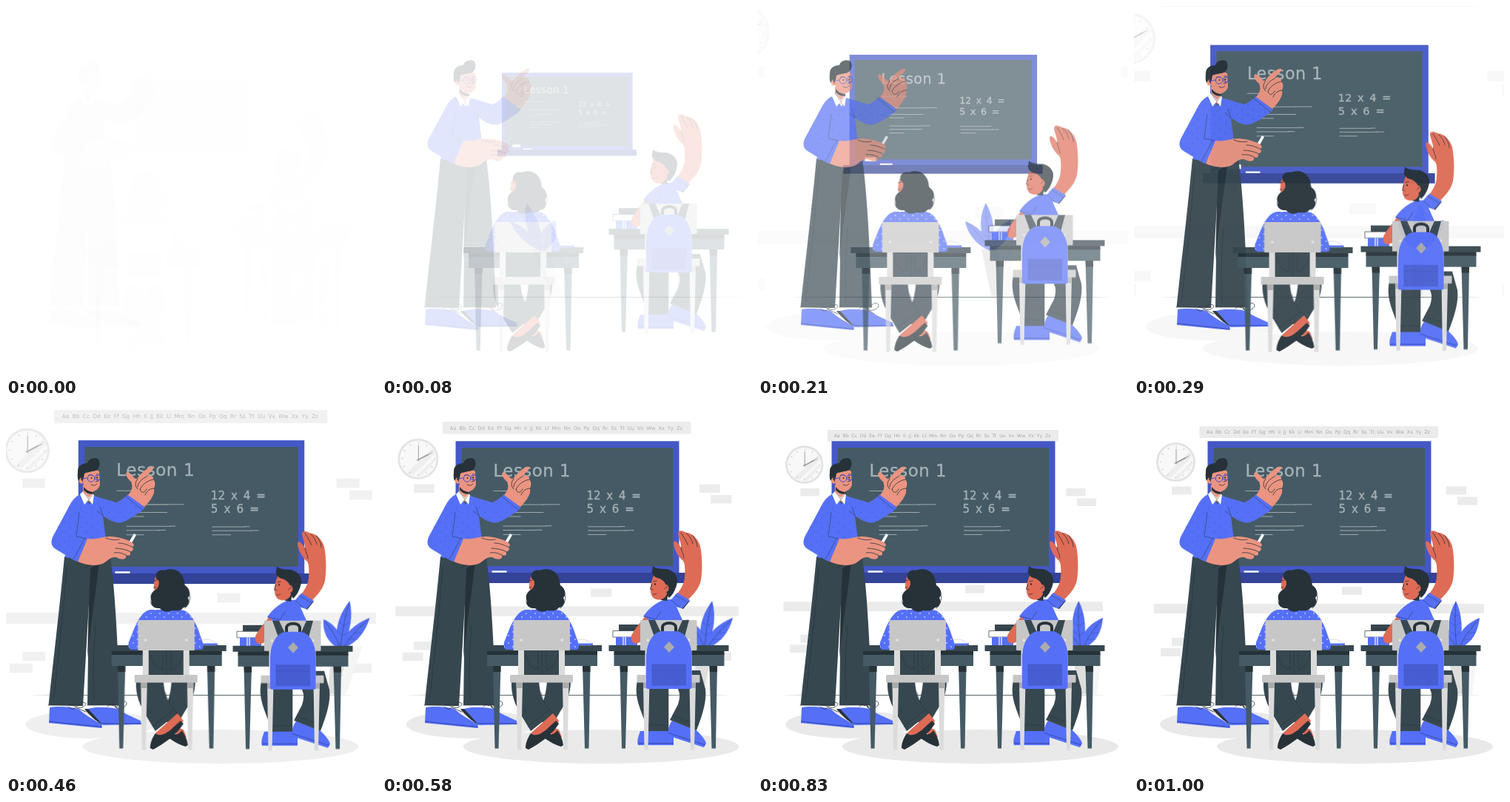
Write an HTML page that moves like this. It is 500x500 px and loops after 1040 ms.

```html
<!DOCTYPE html>
<html lang="en">
<head>
<meta charset="utf-8">
<title>Lesson</title>
<style>
  html, body { margin: 0; width: 100%; height: 100%; overflow: hidden; background: #fff; }
  svg { display: block; width: 100vw; height: 100vh; }
  text { font-family: "DejaVu Sans", sans-serif; }

  .in { animation: .5s cubic-bezier(.36, -.01, .5, 1.38) both; }
  .slow { animation-duration: 1s; }
  .fade { animation-name: fade; }
  .grow { animation-name: grow; transform-origin: 250px 146.5px; }
  .shrink { animation-name: shrink; transform-origin: 250px 186px; }
  .from-left { animation-name: from-left; }
  .from-right { animation-name: from-right; }
  .from-top { animation-name: from-top; }
  .rush { animation-name: rush; transform-origin: 440px 330px; }

  @keyframes fade { from { opacity: 0; } }
  @keyframes grow { from { opacity: 0; transform: scale(.5); } }
  @keyframes shrink { from { opacity: 0; transform: scale(1.5); } }
  @keyframes from-left { from { opacity: 0; transform: translateX(-30px); } }
  @keyframes from-right { from { opacity: 0; transform: translateX(30px); } }
  @keyframes from-top { from { opacity: 0; transform: translateY(-30px); } }
  @keyframes rush {
    from { opacity: 0; transform: translateX(-250px) skewX(20deg); }
    60% { opacity: 1; transform: translateX(0) skewX(-10deg); }
    80% { opacity: 1; transform: translateX(0) skewX(2deg); }
    to { opacity: 1; transform: translateX(0) skewX(0deg); }
  }

  .blue { fill: #5570f7; }
  .deep { fill: #4458c6; }
  .slate { fill: #455a64; }
  .pants { fill: #37474f; }
  .dark { fill: #263238; }
  .skin { fill: #eb9481; }
  .tan { fill: #de6b55; }
  .pale { fill: #ebebeb; }
  .ink { fill: none; stroke: #263238; stroke-width: .8; stroke-linecap: round; stroke-linejoin: round; }
  .thin { stroke-width: .5; }
  .chalk { fill: #fff; stroke: #fff; stroke-width: .35; opacity: .52; }
  .strokes { fill: none; stroke: #fff; stroke-width: 1; stroke-linecap: round; opacity: .48; }
</style>
</head>
<body>
<svg viewBox="0 0 500 500" preserveAspectRatio="none">
  <defs>
    <pattern id="dots" width="12" height="10" patternUnits="userSpaceOnUse">
      <circle cx="3" cy="3" r=".8" fill="#fff"/><circle cx="9" cy="8" r=".8" fill="#fff"/>
    </pattern>
    <pattern id="specks" width="15" height="13" patternUnits="userSpaceOnUse">
      <circle cx="4" cy="4" r=".55" fill="#3345a8"/><circle cx="11" cy="10" r=".55" fill="#3345a8"/>
    </pattern>
    <pattern id="weave" width="3" height="3" patternUnits="userSpaceOnUse">
      <path d="M0 0H3M0 0V3" fill="none" stroke="#4157cc" stroke-width=".5"/>
    </pattern>
    <g id="desk">
      <path class="slate" d="M150 352H160.500L157.500 465.500H152.500ZM271 352H281.500L279.500 465.500H274Z"/>
      <path class="dark" d="M150 353H160.500V362H150.500ZM271 353H281.500V362H271.500Z"/>
      <rect class="slate" x="142" y="337" width="149" height="17"/>
      <rect class="dark" x="142" y="333" width="149" height="6"/>
      <rect class="pants" x="135" y="326" width="162" height="8"/>
    </g>
    <g id="chair">
      <path fill="#dbdbdb" d="M184 330h8v38h-8zM239 330h8v38h-8zM181.500 376H190L188 467.500H183ZM244 376H252.500L250.500 467.500H245.500Z"/>
      <path fill="#ababab" d="M181.500 376H190V384H181.700ZM244 376H252.500V384H244.200Z"/>
      <rect x="177.500" y="292" width="76.500" height="41" rx="1" fill="#c7c7c7"/>
      <rect x="173" y="366" width="85" height="10.500" rx="1" fill="#c7c7c7"/>
      <path fill="#e0e0e0" d="M186 319a2 2 0 1 0 4 0a2 2 0 1 0-4 0M241 319a2 2 0 1 0 4 0a2 2 0 1 0-4 0"/>
    </g>
    <path id="sweater" d="M103 121C96 123 91 128 87 135L65 176C60 184 60 192 67 196L95 213L102 198L136 192L131 151C139 157 149 162 157 160C169 155 181 147 188 140L165 122C159 127 154 131 149 133L119 124L113 136Z"/>
    <path id="blouse" d="M194 278C184 280 178 291 173 302L165 322Q163 332 170 332H262Q268 332 265 322L258 302C253 291 247 280 237 278Z"/>
  </defs>

  <g class="in slow from-left" fill="#e9e9e9">
    <ellipse cx="122" cy="433" rx="87" ry="19"/>
    <ellipse cx="298.500" cy="463" rx="186.500" ry="23"/>
  </g>

  <!-- wall -->
  <g class="in slow shrink">
    <path class="pale" d="M51 111.500h26.500v11h-26.500zM422 111.500h27v11h-27zM437 125.500h27v11h-27zM281 247h27v11h-27zM27 270h446v13h-446zM51 316h27v11h-27zM36 330h27v11h-27zM437 330h26.500v11h-26.500z"/>
    <rect class="pale" x="88.500" y="30" width="322.500" height="16"/>
    <text x="249" y="40.300" font-size="6.400" word-spacing="1.850" text-anchor="middle" fill="#a6a6a6">Aa Bb Cc Dd Ee Ff Gg Hh Ii Jj Kk Ll Mm Nn Oo Pp Qq Rr Ss Tt Uu Vv Ww Xx Yy Zz</text>
    <circle cx="56.500" cy="78.500" r="26.500" fill="#e2e2e2"/>
    <circle cx="56.500" cy="78.500" r="23.800" fill="#f8f8f8"/>
    <path d="M42 97L75 65L78.500 71L50 99.500ZM54 101L79.500 76L79.800 80L60 101Z" fill="#ededed"/>
    <circle cx="56.500" cy="78.500" r="20.700" fill="none" stroke="#bdbdbd" stroke-width="2.500" stroke-dasharray=".8 10.039" stroke-dashoffset=".4"/>
    <path d="M57 81.500V60.500M54.500 80.500L74 70.500" fill="none" stroke="#a6a6a6" stroke-width="1.100"/>
    <path d="M57 79.500L70 72.500" stroke="#999" stroke-width="1.600"/>
    <circle cx="57" cy="79.300" r="1.500" fill="#a6a6a6"/>
  </g>

  <path class="in from-right dark" d="M32 393.400L140 393.100H370L470 393.400L370 393.700H140Z"/>

  <!-- blackboard -->
  <g class="in grow">
    <rect class="deep" x="99.500" y="50.200" width="302" height="179"/>
    <rect class="slate" x="108" y="59" width="285" height="160"/>
    <rect x="89.500" y="228" width="321" height="14" fill="#334397"/>
    <path fill="#fff" d="M148.500 225.300h20v2.400h-20zM124 216h18v6h-18z"/>
    <g class="chalk">
      <text x="150.500" y="97.500" font-size="22.800" letter-spacing=".55">Lesson 1</text>
      <g font-size="15">
        <text x="276.500" y="129" word-spacing="3">12 x 4 =</text>
        <text x="276.500" y="147" word-spacing="3.200">5 x 6 =</text>
      </g>
    </g>
    <path class="strokes" d="M151 117.500H191M164 136H218M164 146.500H218M164 152H187M164 165H222M164 170.500H208M164 176.500H187M278.500 165.800H322M278.500 171H330M278.500 176.500H303"/>
    <path class="strokes" stroke-width=".6" d="M218 135.800H240M208 170.300H216M222 164.700H229M322 165.500H328M330 170.700H340"/>
  </g>

  <!-- plant -->
  <g class="in slow rush">
    <path fill="#f5f5f5" d="M444 328H465L457 392H444Z"/>
    <path fill="#dedede" d="M424 328H447L445 392H432Z"/>
    <path class="blue" d="M435 266C424 285 422 308 433 330H439C445 308 444 285 435 266ZM467 289C448 297 435 311 438 330H441C458 321 465 308 467 289ZM405 291C407 310 420 325 436 331C434 312 425 299 405 291Z"/>
    <path class="ink thin" d="M435 269C433 291 434 311 436 330M466 291C455 304 444 316 440 330M407 293C418 304 429 317 436 330"/>
    <path fill="none" stroke="#3a4db2" stroke-width=".5" d="M434 288L428 282M434 288L440 283M434 300L426 294M434 300L442 295M435 313L427 307M435 313L442 308M457 302L457 298M450 310L460 309M445 318L457 318"/>
  </g>

  <!-- teacher -->
  <g class="in fade">
    <path class="blue" d="M59 410C68 408 92 409 99 413C109 422 121 428 130 433L129 438L58 431Z"/>
    <path class="dark" d="M106 412H113L133 432L129 432.500C121 428 112 420 106 412Z"/>
    <path class="blue" d="M111 412C122 408 143 410 151 412C160 419 172 423 182 428L183 433L131 434Z"/>
    <path d="M58 429L130 436.500M128 431.500L183 432" fill="none" stroke="#3547b0" stroke-width="1"/>
    <path class="pants" d="M79 206L141 207C147 248 151 320 154 407H110L112 270L104 408L57.500 407C64 345 72 280 79 206Z"/>
    <path class="dark" d="M114 222L126 214C122 250 115 292 110 344L112 270Z"/>
    <path class="ink" d="M106 222L127 212M82 218C78 280 70 350 64 400M119 400C117 380 118 340 121 300M57 407H104M110 407H154" opacity=".8"/>
    <path class="ink" stroke-width="1.100" d="M84 409C90 416 95 410 99 405C107 401 112 406 103 410C95 413 90 404 86 407M96 411L108 416M137 409C143 403 148 404 148 410C154 413 163 410 163 404C159 398 153 404 150 409L139 406M148 410L157 416"/>

    <path class="skin" d="M104 109L118 112V124L113 133L104 121Z"/>
    <path class="dark" d="M105 112C109 117 114 119 118 119V122C112 122 107 119 105 116Z"/>
    <use href="#sweater" class="blue"/>
    <use href="#sweater" fill="url(#specks)"/>
    <path class="blue" d="M92 178L111 183L97 213L86 208L79 207Z"/>
    <path class="ink thin" d="M99 146L95 179L108 182M91 210L106 182M127 139L131 151C128 149 126 147 124 144M161 124L184 143"/>
    <path fill="#fff" d="M104 118L100 122L106 136L112 129L117 136L119 123L117 121L112 127Z"/>
    <path class="ink thin" d="M104 118L112 129L118 121"/>
    <path class="skin" d="M103 93C102 104 105 113 112 117C119 120 125 116 127 109L126 91L114 86Z"/>
    <ellipse class="skin" cx="102" cy="103" rx="3.300" ry="4.500"/>
    <path class="dark" d="M98 104C96 99 97 94 97 91C97 84 102 80 110 80C111 74 119 72 124 74C128 78 127 85 123 89C118 92 111 91 106 94C105 98 105 102 103 104L101 99Z"/>
    <path class="ink" d="M111 97C113 95 115 95 117 97M122 95L125 95M122 99L125 104L121 105M115 109C118 111 121 110 123 108M101 101L104 105"/>
    <circle cx="115.500" cy="100" r="1" class="dark"/><circle cx="123.500" cy="99" r="1" class="dark"/>
    <g fill="none" stroke="#3d54d6" stroke-width="1"><circle cx="115" cy="100.500" r="4.700"/><circle cx="124" cy="99.500" r="3.500"/><path d="M103 101L110 100"/></g>

    <path class="skin" d="M165 123C170 117 172 112 169 105C163 100 160 93 164 92C168 92 173 102 177 101C184 92 194 83 199 85C201 88 194 92 190 98C196 95 200 98 199 102C203 106 201 112 200 114C202 121 195 131 187 139Z"/>
    <path class="ink" d="M178 101C174 106 174 111 178 115M190 98C184 101 178 106 178 112M199 102C192 103 183 109 181 116C184 122 188 119 190 115M200 114C194 114 189 119 188 123"/>
    <path d="M164 190L173 175L176 177L168 191Z" fill="#fff"/>
    <path class="skin" d="M110 182C121 184 131 179 140 179C151 179 162 183 167 185C173 188 175 192 170 193C174 196 171 200 167 199C170 204 166 206 162 204C164 211 155 211 149 207C140 206 137 213 130 216C119 220 107 217 97 213Z"/>
    <path class="ink" d="M152 188C160 188 165 191 170 193M148 195C156 195 162 197 167 199M146 201C153 200 158 202 162 204M135 181C141 184 148 184 153 183"/>
  </g>

  <!-- pupil with raised hand -->
  <g class="in from-top">
    <path class="tan" d="M397 259C404 250 409 242 409 233C410 221 409 215 407 212C400 207 394 195 394 187C396 183 400 187 404 194C405 188 400 180 400 174C402 169 408 172 411 174C419 174 427 182 430 192C433 206 433 226 431 238C428 251 419 259 411 267Z"/>
    <path class="ink" d="M404 194C405 200 408 203 408 208M404 174C408 180 411 185 413 190M411 174C416 179 419 184 420 189M419 177C424 183 426 188 426 193"/>
    <use href="#desk" x="171.500"/>
    <path class="pants" d="M320 298h29v9h-29z"/>
    <path class="ink" d="M323 304H348"/>
    <path fill="#fff" stroke="#263238" stroke-width=".7" d="M344 306.500H312V315H344"/>
    <path class="blue" d="M316 315h29v11h-29z"/>
    <path d="M326 315v11M329 315v11" stroke="#fff" stroke-width="1.200"/>
    <path class="tan" d="M358 284C350 294 340 306 337 313C336 318 338 323 343 324L358 318L366 288Z"/>
    <path class="dark" d="M398 273L407 277L416 266L409 265Z"/>
    <path class="blue" d="M353 287C361 276 370 268 383 264L391 264L399 255L416 265L406 276L398 274L406 292V320H360V291Z"/>
    <path class="ink thin" d="M354 287L370 291L377 280M396 258L413 268M391 265L402 275"/>
    <path class="dark" d="M374 258L387 254L385 266L377 265Z"/>
    <path class="tan" d="M368 230C365 236 364 241 363 246C362 254 364 263 371 264C378 266 384 262 386 254L388 235Z"/>
    <path class="dark" d="M366 219C370 222 376 223 382 223C392 223 400 231 399 240C398 249 393 258 388 262C384 258 384 250 383 243C381 239 377 236 372 235C367 233 364 229 365 225Z"/>
    <ellipse class="tan" cx="384" cy="249" rx="3.500" ry="5"/>
    <path class="ink" d="M367 240L371 239M365 243L362.500 250L366 251M366 257C368 258 370 257 371 256M382 250L386 246"/>
    <circle class="dark" cx="369" cy="243.500" r="1.200"/>

    <path class="blue" d="M349 442L386 441L394 447V461H346C344 454 347 448 349 442Z"/>
    <path class="blue" d="M392 428L424 440C431 447 437 453 438 459L435 464L386 448C386 440 388 433 392 428Z"/>
    <path d="M346 458.500H394M386.500 444.500L436 460.500" stroke="#3547b0" stroke-width="1"/>
    <path class="pants" d="M345 374C342 388 344 400 351 418L360 442H387V374Z"/>
    <path class="pants" d="M388 374C404 384 404 394 400 406L389 427L425 441C434 418 439 400 437 385L430 360H388Z"/>
    <path class="ink thin" d="M361 434H386M393 421L427 434M387 384V438"/>
    <use href="#chair" x="171.500"/>
    <path class="pants" d="M360 292H369L378 311L370 320ZM406 292H415L408 318L398 310Z"/>
    <path d="M379 309V302C379 294 397 294 397 302V309" fill="none" stroke="#263238" stroke-width="4"/>
    <path class="blue" d="M357 340C358 324 365 308 379 307H397C411 308 418 324 418.500 340V383Q418.500 385 416 385H359.500Q357 385 357 383Z"/>
    <rect class="deep" x="364.500" y="352" width="46.500" height="28.500" opacity=".75"/>
    <rect x="364.500" y="352" width="46.500" height="28.500" fill="url(#weave)"/>
    <path d="M364 352H411M364 360H411" fill="none" stroke="#3d51c2" stroke-width=".7"/>
    <path d="M388 321L395 328.500L388 336L381 328.500Z" fill="#ababab"/>
  </g>

  <!-- pupil on the left -->
  <g class="in from-left">
    <use href="#desk"/>
    <path fill="#fff" stroke="#b8c0d8" stroke-width=".6" d="M257 325C262 316 273 316 283 323V326H257Z"/>
    <path class="blue" d="M262 323.500h23v2.500h-23z"/>
    <use href="#blouse" class="blue"/>
    <use href="#blouse" fill="url(#dots)"/>
    <path class="tan" d="M204 230C199 235 199 243 199 249L202 257H211V231Z"/>
    <path class="dark" d="M203 237C199 229 206 223 213 225C220 222 231 223 235 229C240 234 240 240 241 245C248 249 249 258 245 262C249 268 244 275 239 275C235 281 226 279 223 279C216 283 209 279 207 276C199 277 194 271 196 266C192 259 198 252 203 250C206 246 207 242 205 238Z"/>
    <path class="ink" d="M240 246C249 252 246 256 248 261C247 267 246 272 241 276M197 260C194 265 194 271 199 274"/>
    <path class="ink" stroke="#455a64" stroke-width=".5" d="M225 236C232 242 235 252 232 263M211 249C207 257 206 264 209 270"/>
    <path class="ink" d="M199 239L203 238M199 248L202 248"/>

    <path class="pants" d="M193 332H240L246 370H186Z"/>
    <path class="ink thin" d="M216 333V366M194 338C196 350 202 357 211 359V336M222 336V359C232 357 236 348 238 338"/>
    <path class="pants" d="M255 374C255 392 249 403 240 417L229 436L206 424C216 411 222 394 223 374Z"/>
    <path class="tan" d="M228 436L239 440L243 450L230 452Z"/>
    <path class="dark" d="M219 441C226 448 232 448 237 441C241 447 244 453 245 461L242 463C232 460 222 454 214 447Z"/>
    <path class="pants" d="M175 374C174 393 180 407 189 422L201 442L231 418C218 406 213 392 212 374Z"/>
    <path class="tan" d="M202 444L231 418L239 428L236 436L214 447L200 452Z"/>
    <path class="ink thin" d="M197 436L226 413M215 390C218 402 223 411 231 418M184 380C184 396 188 407 195 418"/>
    <path class="dark" d="M201 445C207 450 215 446 222 440L235 428L239 432C230 447 213 459 198 467L194 465C194 458 197 451 201 445Z"/>
    <use href="#chair"/>
  </g>
</svg>
<script>
  // The scene is drawn on 24 pictures per second, each sampled a little past its middle.
  const LOOP = 1040, STEP = 1000 / 24;
  const anims = document.getAnimations();
  anims.forEach(a => a.pause());

  function tick() {
    const picture = Math.floor((performance.now() % LOOP + 4) / STEP);
    const time = (picture + .6) * STEP;
    anims.forEach(a => { a.currentTime = time; });
    requestAnimationFrame(tick);
  }
  tick();
</script>
</body>
</html>
```
